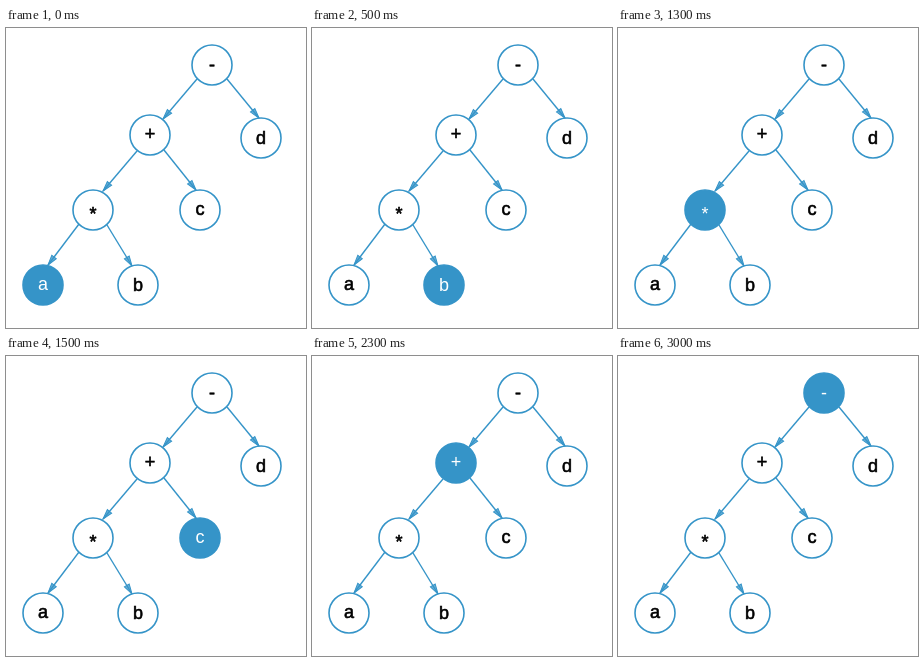
An HTML page that plays this animation: 300x300 px, repeating every 3.5 s.

```html
<!DOCTYPE html>
<html lang="en">
<head>
<meta charset="utf-8">
<title>Postorder traversal</title>
<style>
html, body { margin: 0; width: 100%; height: 100%; overflow: hidden; background: #fff; }
svg { display: block; width: 100vw; height: 100vh; }
circle { stroke: #3594c8; stroke-width: 1.6; }
line { stroke: #3594c8; stroke-width: 1.4; }
path { fill: #3594c8; fill-opacity: .75; stroke: #3594c8; stroke-width: 1; }
text { font: 18px "Liberation Sans", Arial, sans-serif; text-anchor: middle; }
</style>
</head>
<body>
<svg id="stage" viewBox="0 0 300 300"></svg>
<script>
const STEP = 500;
const stage = document.getElementById("stage");

// Nodes in visiting order: label, centre, text baseline
const nodes = [
  ["a", 37, 257, 262],
  ["b", 132, 257, 263],
  ["*", 87, 182, 192],
  ["c", 194, 182, 187],
  ["+", 144, 107, 112],
  ["d", 255, 110, 116],
  ["-", 206, 37, 43]
];

const edges = [
  [191, 51, 157, 91],
  [221, 51, 253, 90],
  [131, 123, 97, 163],
  [158, 122, 190, 162],
  [73, 196, 42, 237],
  [101, 197, 126, 238]
];

function add(tag, attrs) {
  const el = document.createElementNS("http://www.w3.org/2000/svg", tag);
  for (const key in attrs) el.setAttribute(key, attrs[key]);
  return stage.appendChild(el);
}

for (const [x1, y1, x2, y2] of edges) {
  add("line", { x1, y1, x2, y2 });
  const angle = Math.atan2(y2 - y1, x2 - x1) * 180 / Math.PI;
  add("path", { d: "M0 0L-10 -2.8V2.8Z", transform: `translate(${x2} ${y2}) rotate(${angle})` });
}

const views = nodes.map(([label, x, y, base]) => {
  const disc = add("circle", { cx: x, cy: y, r: 20 });
  const text = add("text", { x, y: base });
  text.textContent = label;
  return { disc, text };
});

function draw(time) {
  const current = Math.floor(time / STEP) % nodes.length;
  views.forEach(({ disc, text }, i) => {
    const on = i === current;
    disc.setAttribute("fill", on ? "#3594c8" : "#fff");
    text.setAttribute("fill", on ? "#fff" : "#000");
    text.setAttribute("stroke", on ? "none" : "#000");
    text.setAttribute("stroke-width", 0.6);
  });
}

const start = performance.now();
function tick() {
  draw(performance.now() - start);
  requestAnimationFrame(tick);
}
tick();
</script>
</body>
</html>
```
